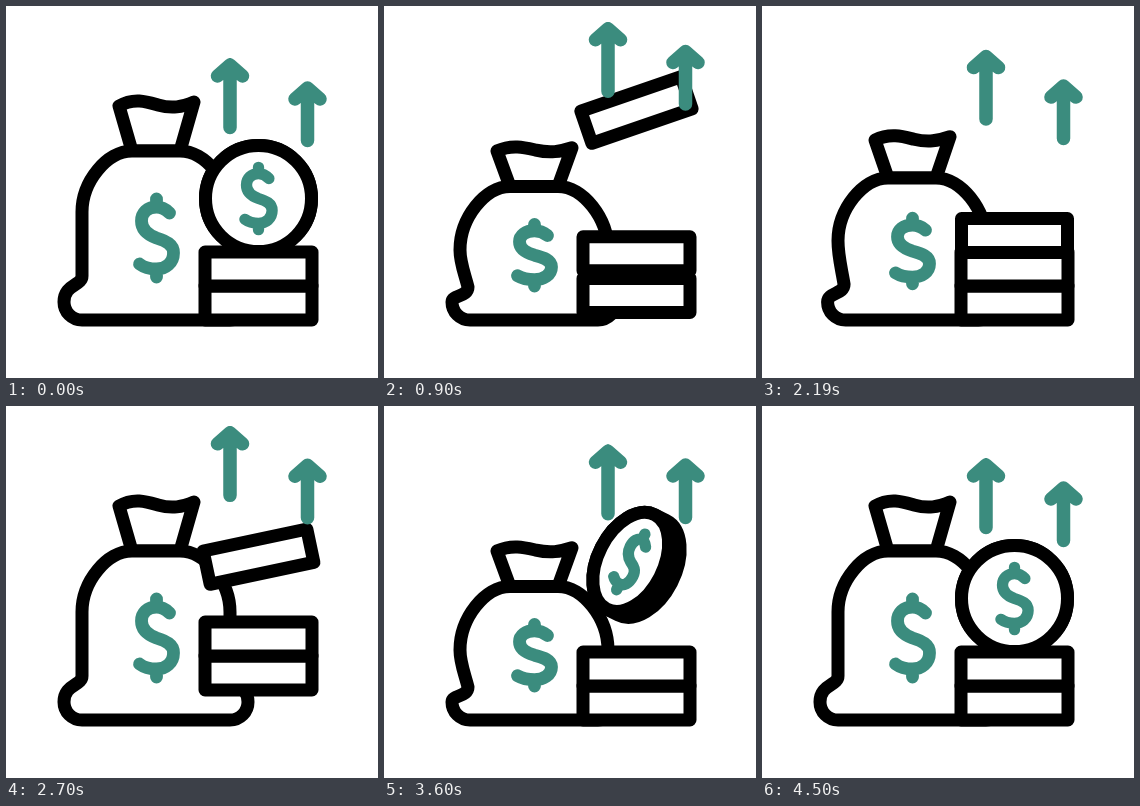
Recreate the animation shown at these times as an HTML page. Size 372x372 px, loop 4800 ms.

```html
<!DOCTYPE html>
<html lang="en">
<head>
<meta charset="utf-8">
<title>Savings</title>
<style>
  html, body { margin: 0; width: 100%; height: 100%; overflow: hidden; background: #fff; }
  svg { display: block; width: 372px; height: 372px; }
  .ink { fill: #fff; stroke: #000; stroke-width: 13; }
  .teal { fill: none; stroke: #3b8c7e; stroke-width: 13.5; }
  .dollar { stroke-width: 12.8; vector-effect: non-scaling-stroke; }
  .small { stroke-width: 11.3; }
  svg * { stroke-linecap: round; stroke-linejoin: round; }
</style>
</head>
<body>
<svg viewBox="0 0 372 372">
  <defs>
    <path id="sign" d="M13-25C9-29 4-31 0-31C-9-31-15-25-15-17C-15-8-8-3 0 0C9 3 17 6 17 15C17 25 9 31 0 31C-7 31-13 29-17 26M0-39V-31M0 31V39"/>
  </defs>
  <path id="sack" class="ink"/>
  <path id="body" class="ink"/>
  <path id="bagSign" class="teal dollar"/>
  <rect id="low" class="ink" x="199" y="280" width="107" height="34"/>
  <rect id="high" class="ink" x="199" y="246" width="107" height="34"/>
  <g id="piece">
    <path id="side" class="ink"/>
    <ellipse id="face" class="ink" ry="53"/>
    <path id="coinSign" class="teal dollar small"/>
  </g>
  <path id="arrowA" class="teal" d="M224 121.5V59M211.5 70L224 59L236.5 70"/>
  <path id="arrowB" class="teal" d="M301.5 134.5V82M289 93L301.5 82L314 93"/>
</svg>
<script>
const $ = id => document.getElementById(id);
const set = (id, attrs) => {
  for (const name in attrs) $(id).setAttribute(name, attrs[name]);
};
const LOOP = 4800, STEP = 30, END = 4500;
const lerp = (a, b, u) => a + (b - a) * u;
const smooth = u => u * u * (3 - 2 * u);

// Eased value of a track of [time, value] keys; values are numbers or lists.
function at(keys, t) {
  let i = 0;
  while (i < keys.length - 2 && t >= keys[i + 1][0]) i++;
  const [t0, a] = keys[i], [t1, b] = keys[i + 1];
  const u = smooth(Math.min(1, Math.max(0, (t - t0) / (t1 - t0))));
  return Array.isArray(a) ? a.map((v, n) => lerp(v, b[n], u)) : lerp(a, b, u);
}

// Bag poses: floor, vertical scale, height of the widest part, waist x, foot x, foot height
const REST = [314, 1, 108, 76, 58, 44];
const SQUASH = [314, 0.79, 70, 84, 68, 33];
const STRETCH = [277, 1.15, 120, 84, 68, 46];
const bagKeys = [[0, REST], [900, SQUASH], [1350, STRETCH], [1800, SQUASH], [1950, SQUASH],
  [2700, REST], [3600, SQUASH], [4050, STRETCH], [4500, REST]];

// Flying piece: centre y, turn in degrees, openness of the face (0 brick, 1 coin)
const COIN = [192.5, 0, 1], TOP = [104, 71, 0], BRICK = [229.5, 90, 0];
const pieceKeys = [[0, COIN], [900, TOP], [1800, BRICK], [2190, BRICK], [3060, TOP], [3990, COIN]];

const lowKeys = [[0, 0], [450, -30], [1120, 0], [2190, 0], [2700, -30], [3370, 0]];
const highKeys = [[0, 0], [450, -32], [1320, 0], [2190, 0], [2700, -30], [3570, 0]];
const arrowAKeys = [[0, 0], [810, -37], [1850, 0], [2950, -37], [4060, 0]];
const arrowBKeys = [[0, 0], [970, -37], [2030, 0], [3190, -37], [4170, 0]];

function drawBag(t) {
  const [floor, k, wide, waist, foot, h] = at(bagKeys, t);
  const p = (x, y) => `${x} ${floor + y} `;
  const q = (x, y) => p(x, y * k);
  const m = x => 300 - x;
  const neck = 169 * k;
  const shoulder = -lerp(wide, neck, 0.5);
  const slopeX = lerp(76, waist, 0.6), slopeY = -lerp(wide, h, 0.65), sideY = -lerp(wide, h, 0.35);
  set('sack', { d: 'M' + q(126, -169) + 'L' + q(113, -214)
    + 'C' + q(128, -223) + q(142, -218) + q(152, -215)
    + 'C' + q(166, -211) + q(176, -213) + q(188, -218)
    + 'L' + q(174, -169) + 'Z' });
  set('body', { d: 'M' + q(126, -169)
    + 'C' + p(101, -neck) + p(76, shoulder) + p(76, -wide)
    + 'C' + p(76, sideY) + p(slopeX, slopeY) + p(waist, -h)
    + 'C' + p(waist, 10 - h) + p(foot, 8 - h) + p(foot, -18)
    + 'C' + p(foot, -8) + p(foot + 8, 0) + p(foot + 18, 0)
    + 'L' + p(m(foot + 18), 0)
    + 'C' + p(m(foot + 8), 0) + p(m(foot), -8) + p(m(foot), -18)
    + 'C' + p(m(foot), 8 - h) + p(m(waist), 10 - h) + p(m(waist), -h)
    + 'C' + p(m(slopeX), slopeY) + p(224, sideY) + p(224, -wide)
    + 'C' + p(224, shoulder) + p(199, -neck) + q(174, -169) + 'Z' });
  set('bagSign', { transform: `translate(150.5 ${floor - 82 * k}) scale(1 ${k})` });
}

function drawPiece(t) {
  const [y, turn, open] = at(pieceKeys, t);
  const R = 53, rx = R * open, s = 17 * (1 - open);
  const edgeOn = open < 0.1;
  set('piece', { transform: `translate(252.5 ${y}) rotate(${turn})` });
  set('side', {
    d: `M${s} ${-R}A${rx} ${R} 0 0 1 ${s} ${R}L${-s} ${R}A${rx} ${R} 0 0 1 ${-s} ${-R}Z`,
    style: `fill:${edgeOn ? '#fff' : '#000'}`
  });
  set('face', { cx: -s, rx, visibility: edgeOn ? 'hidden' : 'visible' });
  set('coinSign', {
    transform: `translate(${-s} 0) scale(${Math.max(0.01, 0.8 * open)} 0.8)`,
    visibility: edgeOn ? 'hidden' : 'visible'
  });
}

function draw(t) {
  const shift = (id, keys) => set(id, { transform: `translate(0 ${at(keys, t)})` });
  drawBag(t);
  shift('low', lowKeys);
  shift('high', highKeys);
  drawPiece(t);
  shift('arrowA', arrowAKeys);
  shift('arrowB', arrowBKeys);
}

const signPath = $('sign').getAttribute('d');
set('bagSign', { d: signPath });
set('coinSign', { d: signPath });

const start = performance.now();
function tick() {
  const t = (performance.now() - start) % LOOP;
  draw(Math.min(END, Math.floor(t / STEP) * STEP));
  requestAnimationFrame(tick);
}
tick();
</script>
</body>
</html>
```
